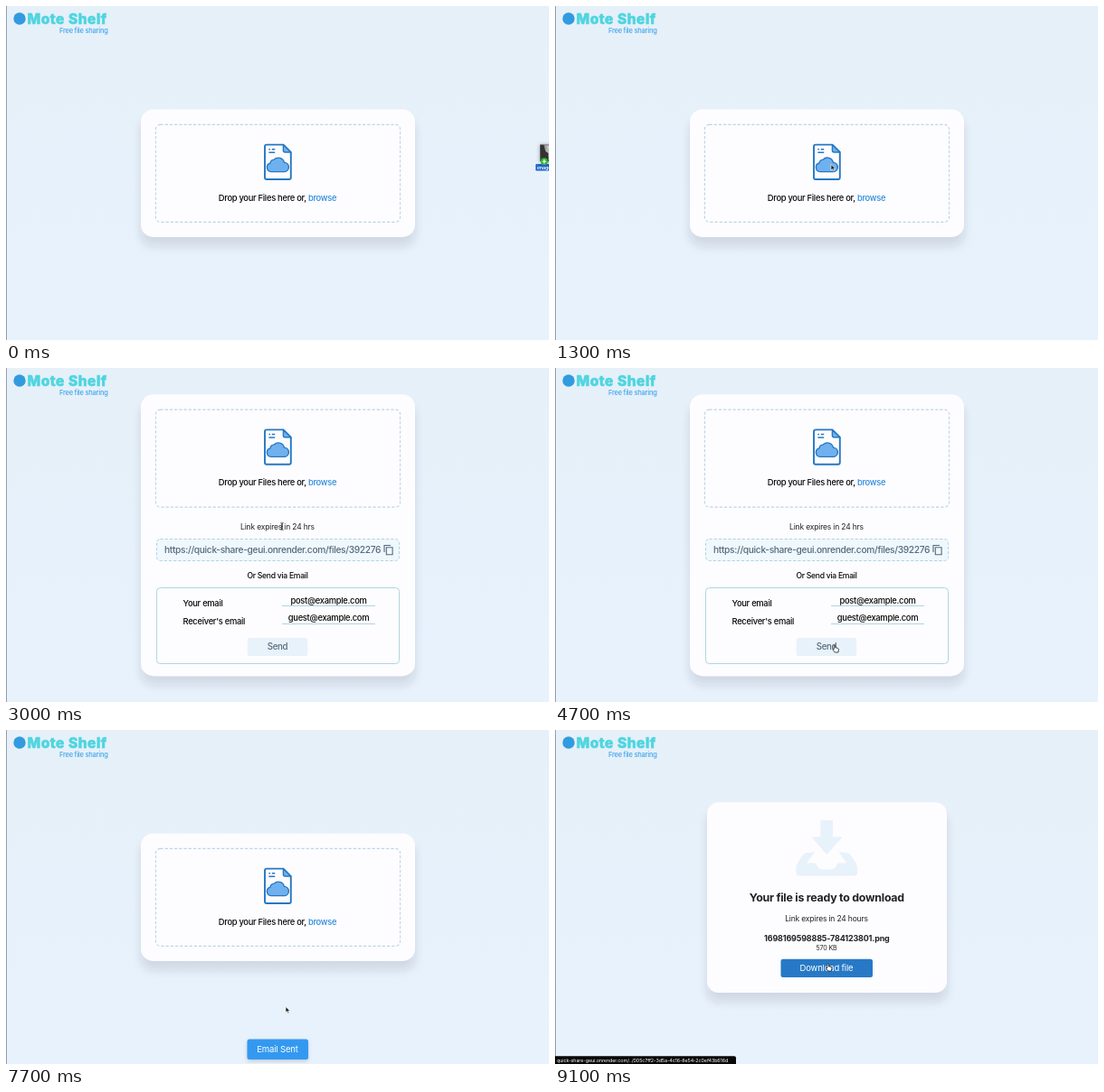
An HTML page that plays this animation: 600x370 px, repeating every 9200 ms.

```html
<!DOCTYPE html>
<html lang="en">
<head>
<meta charset="utf-8">
<title>File sharing</title>
<style>
  html, body { margin: 0; width: 100%; height: 100%; overflow: hidden; background: #e7f1fa; }
  svg { display: block; width: 100vw; height: 100vh; }
  text { font-family: Inter, "Open Sans", sans-serif; font-size: 9.4px; font-weight: 500; letter-spacing: -.032em; fill: #080808; white-space: pre; }
  .mid { text-anchor: middle; }
  .card { fill: #fdfcff; filter: url(#shade); }
  .file { fill: #fdfcff; stroke: #2578c3; stroke-width: 1.9; stroke-linejoin: round; color: #6fb1ee; }
  .side { color: #86afd8; stroke: #3f7fb8; }
  .pale { fill: #e7f2fb; }
  .dim { fill: #55687c; }
  .note { font-size: 8.5px; font-weight: 400; letter-spacing: -.02em; fill: #222; }
  .white { fill: #fff; letter-spacing: -.02em; font-weight: 400; }
  .field { fill: none; stroke: #aed6e0; }
  .ink { fill: #111; stroke: #fff; stroke-width: .7; stroke-linejoin: round; }
</style>
</head>
<body>
<svg viewBox="0 0 600 370" preserveAspectRatio="none">
  <defs>
    <linearGradient id="sky" x2="0" y2="1">
      <stop stop-color="#e6f0f9"/><stop offset="1" stop-color="#e8f2fc"/>
    </linearGradient>
    <linearGradient id="photo" x2="1" y2="1">
      <stop stop-color="#777"/><stop offset=".5" stop-color="#c9c9c9"/><stop offset="1" stop-color="#666"/>
    </linearGradient>
    <filter id="shade" x="-10%" y="-10%" width="120%" height="130%">
      <feDropShadow dx="0" dy="10" stdDeviation="5" flood-color="#234" flood-opacity=".13"/>
    </filter>
    <clipPath id="urlClip"><path d="M170 190H415.3V213H170Z"/></clipPath>
    <g id="doc">
      <path d="M-12.5-19.2H6L14.4-10.8V17.2a2 2 0 0 1-2 2H-12.4a2 2 0 0 1-2-2V-17.2a2 2 0 0 1 2-2Z"/>
      <path d="M6-19.2V-12.8a2 2 0 0 0 2 2H14.4Z" fill="currentColor" stroke-width="1.4"/>
      <path d="M-7.5 10.8a4.9 4.9 0 0 1-.9-9.6a4.6 4.6 0 0 1 4.2-3.9a6.6 6.6 0 0 1 11.2 3.2a5.2 5.2 0 0 1 .8 10.3Z" fill="currentColor" stroke-width="1.4"/>
      <path d="M-10-14h1.6m1.8 0h3.4M-10-10.6h6.8" stroke-width="1.5"/>
    </g>
  </defs>

  <rect width="600" height="370" fill="url(#sky)"/>

  <g id="home">
    <rect id="card" class="card" x="149" width="303" rx="14"/>
    <g id="zone">
      <rect id="dash" x="165.5" y=".5" width="270" height="108" rx="5" stroke-width="1.05" stroke-dasharray="3.2 2"/>
      <g class="file">
        <g id="left" class="side"><use href="#doc"/></g>
        <g id="right" class="side"><use href="#doc"/></g>
        <g id="front"><use href="#doc"/></g>
      </g>
      <text class="mid" x="300" y="84.7">Drop your Files here or, <tspan fill="#2b8bdc">browse</tspan></text>
    </g>

    <g id="upload">
      <rect class="pale" x="165" y="230" width="270.5" height="38.5" rx="4"/>
      <text id="stage" x="174" y="244" style="font-size:8.7px"></text>
      <text id="percent" class="note" x="176.5" y="256" style="font-size:7.5px"></text>
      <rect id="bar" x="174" y="260.2" height="1.7" rx=".8" fill="#2b95ee"/>
    </g>

    <g id="share">
      <text class="mid note" x="300" y="178.6">Link expires in 24 hrs</text>
      <rect x="166.5" y="189.5" width="268" height="24" rx="4" fill="#eff8fc" stroke="#aed6e0" stroke-dasharray="3.2 2"/>
      <text class="dim" x="175" y="205.2" clip-path="url(#urlClip)" style="font-size:10.2px">https://quick-share-geui.onrender.com/files/392276</text>
      <path d="M418 204V196.5H425M420.3 198.8h6.8v8h-6.8Z" fill="none" stroke="#56687b" stroke-width="1.1"/>
      <text class="mid" x="300" y="232.7" style="font-size:8.6px">Or Send via Email</text>
      <rect class="field" x="166.5" y="243.5" width="268" height="84" rx="4"/>
      <text x="195.5" y="264">Your email</text>
      <text x="195.5" y="283.5">Receiver's email</text>
      <text class="mid" x="356.5" y="260.7">post@example.com</text>
      <text class="mid" x="356.5" y="280.4">guest@example.com</text>
      <path class="field" d="M305 263.5H408M305 283.5H408"/>
      <rect id="button" class="pale" y="299" height="20" rx="2.5"/>
      <text id="label" class="mid dim" x="300" y="312.3" style="font-size:9.7px"></text>
    </g>

    <g id="toast">
      <rect x="266.5" y="342.5" width="67.5" height="22.5" rx="2.5" fill="#3399f0" style="filter:drop-shadow(0 2px 2px #2343)"/>
      <text class="mid white" x="300" y="357.1" style="font-size:9.6px">Email Sent</text>
    </g>
  </g>

  <g id="page">
    <rect class="card" x="168" y="80" width="265" height="211" rx="13"/>
    <g class="pale">
      <path d="M293.5 100h13.5v18.5h10.5L300.3 138 283.5 118.5h10Z"/>
      <path d="M276 136.5L287 135 278 147.5H288Q291 154.5 295 154.5H305.500Q309.500 154.500 312.500 147.500H322.500L313.500 135 324.500 136.500Q331 143 334 151.500V158Q334 161.500 330.500 161.500H270Q266.500 161.500 266.500 158V151.500Q269.500 143 276 136.500Z"/>
    </g>
    <text class="mid" x="300.3" y="190.2" style="font-size:12.4px;font-weight:700;letter-spacing:-.02em;fill:#222">Your file is ready to download</text>
    <text class="mid note" x="300" y="211.6">Link expires in 24 hours</text>
    <text class="mid" x="300.3" y="233.8" style="font-size:9px;font-weight:700;letter-spacing:-.02em;fill:#222">1698169598885-784123801.png</text>
    <text class="mid note" x="300" y="244.2" style="font-size:7.1px">570 KB</text>
    <rect id="get" x="249.5" y="253.7" width="101.5" height="20.3" rx="2.5"/>
    <text class="mid white" x="300" y="267.4" style="font-size:9.5px">Download file</text>
  </g>

  <circle cx="15" cy="14" r="6.7" fill="#329bdf"/>
  <text x="23.5" y="19.7" style="font-size:15.5px;font-weight:800;letter-spacing:.035em;fill:#4fd5df;stroke:#4fd5df;stroke-width:.6;stroke-linejoin:round">Mote Shelf</text>
  <text x="59" y="30.3" style="font-size:7.5px;fill:#40a5e8">Free file sharing</text>
  <rect width="1" height="370" fill="#929da8"/>

  <g id="status">
    <path d="M0 361.2H198a2 2 0 0 1 2 2V370H0Z" fill="#080808"/>
    <text class="white" x="2" y="367.7" style="font-size:5.45px">quick-share-geui.onrender.com/../005c7ff2-3d5a-4c16-8e54-2c0ef43b616d</text>
  </g>

  <g id="drag">
    <rect x="331" y="164" width="20" height="19" fill="url(#photo)" style="filter:drop-shadow(0 1px 2px #0006)"/>
    <path d="M331 165h4l2 7 3 2v9h-9ZM340 183l3-5h8v5Z" fill="#333"/>
    <path d="M338 166h11v6h-8Z" fill="#ccc"/>
    <rect x="326" y="186" width="31.5" height="7.5" rx="1.2" fill="#1f62cb"/>
    <text class="mid white" x="341.7" y="191.6" style="font-size:5.4px;font-weight:600">image.jpeg</text>
    <circle cx="335.5" cy="183.2" r="4" fill="#2eb82e"/>
    <path d="M333.3 183.2h4.4m-2.2-2.2v4.4" stroke="#fff" stroke-width="1.2"/>
  </g>

  <g id="cursor">
    <path id="arrow" class="ink" d="M0 0V6.5L1.5 5.1 2.6 7.4 3.7 6.9 2.7 4.7H4.8Z"/>
    <path id="beam" d="M-1.5-4Q0-4 0-3V3Q0 4-1.5 4M1.5-4Q0-4 0-3V3Q0 4 1.5 4M-.8 0H.8" fill="none" stroke="#222" stroke-width=".8"/>
    <path id="hand" d="M-.7.7q.7-1 1.4 0V3.2l2.8.7q1 .3.9 1.3L4 8.5H.2L-2.2 5.3q.3-1.1 1.5-.2Z" fill="#fff" stroke="#222" stroke-width=".8" stroke-linejoin="round"/>
  </g>
</svg>

<script>
const LOOP = 9200;
const ENTER = 280, DROP = 1060, UPLOAD = 1700, DONE = 2000, SHARE = 2400,
      SEND = 5500, SENT = 6900, PAGE = 8200;
const PATH = [[0, 305, 175.5], [3150, 305, 175.5], [4100, 310.5, 306], [4500, 309, 306.5],
              [8250, 309, 306.5], [8700, 301.5, 258.5]];

const $ = id => document.getElementById(id);
const set = (id, name, value) => $(id).setAttribute(name, value);
const show = (id, on) => set(id, "visibility", on ? "inherit" : "hidden");
const move = (id, x, y, rest = "") => set(id, "transform", `translate(${x} ${y}) ${rest}`);
const ramp = (t, from, span) => Math.min(1, Math.max(0, (t - from) / span));
const smooth = u => u * u * (3 - 2 * u);
const mix = (a, b, u) => a + (b - a) * u;
const tint = (a, b, u) => `rgb(${a.map((v, i) => Math.round(mix(v, b[i], u)))})`;

function pointer(t) {
  let i = PATH.length - 1;
  while (i && PATH[i][0] > t) i--;
  const a = PATH[i], b = PATH[i + 1] || a;
  const u = a === b ? 0 : smooth(ramp(t, a[0], b[0] - a[0]));
  return [mix(a[1], b[1], u), mix(a[2], b[2], u)];
}

function drawZone(t) {
  const hover = smooth(ramp(t, ENTER, 250)) * (1 - smooth(ramp(t, DROP, 250)));
  set("dash", "fill", tint([253, 252, 255], [231, 241, 251], hover));
  set("dash", "stroke", tint([187, 214, 227], [70, 140, 184], hover));
  move("front", 300.4, 42 - 2.5 * hover);
  move("left", 300.4 - 12 * hover, 42 + 4 * hover, `rotate(${-10 * hover}) scale(.9)`);
  move("right", 300.4 + 12 * hover, 42 + 4 * hover, `rotate(${10 * hover}) scale(.9)`);
  show("left", hover > 0);
  show("right", hover > 0);
}

function drawUpload(t) {
  const done = smooth(ramp(t, UPLOAD, DONE - UPLOAD));
  $("stage").textContent = done < 1 ? "Uploading..." : "Uploaded";
  $("percent").textContent = Math.round(done * 100) + "%";
  set("bar", "width", 252.5 * done);
}

function drawCursor(t, sharing, paging) {
  const [x, y] = pointer(t);
  const within = (a, b) => y >= a && y <= b;
  const hand = sharing && within(299, 319) || paging && within(254, 274);
  const beam = sharing && (within(170, 181) || within(189, 214) || within(226, 235) || within(251, 284));
  move("cursor", x, y);
  show("cursor", t >= DROP);
  show("hand", hand);
  show("beam", beam);
  show("arrow", !hand && !beam);
  show("status", paging && hand);
}

function draw(t) {
  const uploading = t >= UPLOAD && t < SHARE;
  const sharing = t >= SHARE && t < SENT;
  const paging = t >= PAGE;
  const height = sharing ? 312 : uploading ? 194 : 141.5;
  const top = 185.2 - height / 2;

  show("home", !paging);
  show("page", paging);
  show("upload", uploading);
  show("share", sharing);
  set("card", "y", top);
  set("card", "height", height);
  move("zone", 0, top + 16.4);
  set("share", "opacity", ramp(t, SHARE, 150));
  drawZone(t);
  drawUpload(t);

  const half = t >= SEND ? 39.3 : 33.2;
  set("button", "x", 300 - half);
  set("button", "width", half * 2);
  $("label").textContent = t >= SEND ? "Sending" : "Send";
  show("toast", t >= SENT && !paging);
  move("toast", 0, 35 * (1 - smooth(ramp(t, SENT, 250))));

  const near = (1 - ramp(t, 0, 700)) ** 2, last = smooth(ramp(t, 700, 300));
  move("drag", 260 * near - 26 * last, -11 * near + last);
  show("drag", t < DROP);

  set("get", "fill", tint([51, 153, 240], [39, 121, 198], ramp(t, 8700, 300)));
  drawCursor(t, sharing, paging);
}

const start = performance.now();
function tick(now) {
  draw(Math.max(0, now - start) % LOOP);
  requestAnimationFrame(tick);
}
draw(0);
requestAnimationFrame(tick);
</script>
</body>
</html>
```
